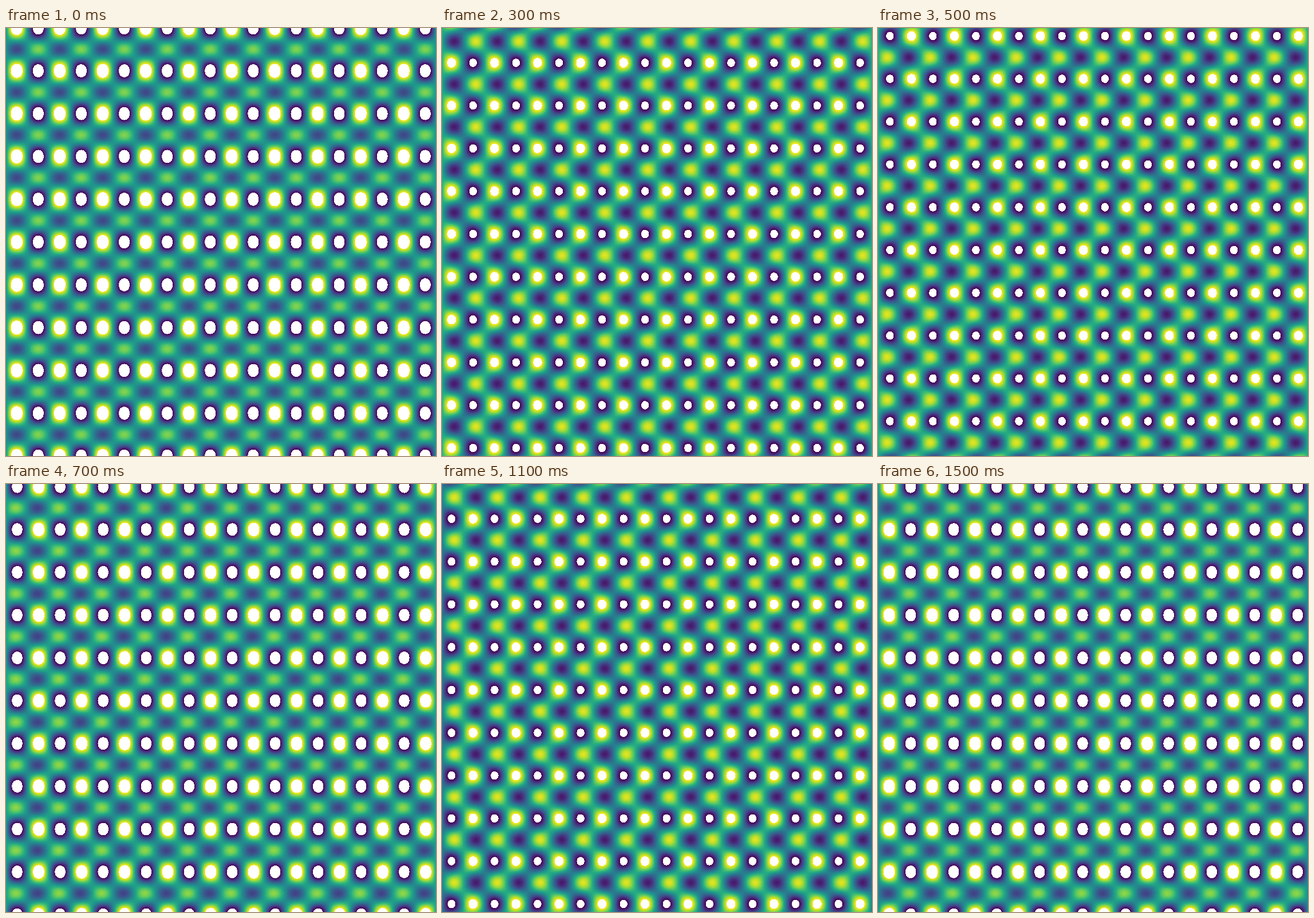
Write an HTML page with a canvas that moves like this. It is 751x746 px and loops after 1.6 s.

```html
<!DOCTYPE html>
<html lang="en">
<head>
<meta charset="utf-8">
<title>Wave field</title>
<style>
html, body { margin: 0; overflow: hidden; background: #fff; }
canvas { display: block; }
</style>
</head>
<body>
<canvas id="stage" width="751" height="746"></canvas>
<script>
const W = 751, H = 746, PERIODS = 10, STEPS = 16, STEP_MS = 100;
const TAU = 2 * Math.PI;
const ctx = document.getElementById('stage').getContext('2d');
const image = ctx.createImageData(W, H);
const pixels = new Uint32Array(image.data.buffer);

// Filled contour bands from LOW upwards; values outside them stay white.
const LOW = -1, BAND = 0.05, BANDS = 39, WHITE = 0xffffffff;
const STOPS = [0x440154, 0x482475, 0x414487, 0x355f8d, 0x2a788e, 0x21918c,
  0x22a884, 0x44bf70, 0x7ad151, 0xbddf26, 0xfde725];

function viridis(u) {
  const i = Math.min(9, Math.floor(u * 10)), f = u * 10 - i;
  const mix = shift => {
    const a = STOPS[i] >> shift & 255, b = STOPS[i + 1] >> shift & 255;
    return Math.round(a + (b - a) * f);
  };
  return (0xff000000 | mix(0) << 16 | mix(8) << 8 | mix(16)) >>> 0;
}

const palette = Array.from({ length: BANDS }, (_, i) => viridis((i + 0.5) / BANDS));
const angles = n => Float64Array.from({ length: n }, (_, i) => (i + 0.5) / n * PERIODS * TAU);
const xs = angles(W), ys = angles(H);
const sinX = xs.map(Math.sin), cosX = xs.map(Math.cos);

// A wave travelling up the stage plus a weaker one sweeping sideways.
function draw(phase) {
  const standing = 0.42 * Math.cos(phase), sideways = 0.21 * Math.sin(phase);
  let p = 0;
  for (let y = 0; y < H; y++) {
    const gain = Math.cos(ys[y] + phase) + standing;
    for (let x = 0; x < W; x++) {
      const band = Math.floor((gain * sinX[x] + sideways * cosX[x] - LOW) / BAND);
      pixels[p++] = band >= 0 && band < BANDS ? palette[band] : WHITE;
    }
  }
  ctx.putImageData(image, 0, 0);
}

let shown = -1;
function tick() {
  const step = Math.floor(performance.now() / STEP_MS) % STEPS;
  if (step !== shown) draw((shown = step) / STEPS * TAU);
  requestAnimationFrame(tick);
}
tick();
</script>
</body>
</html>
```
